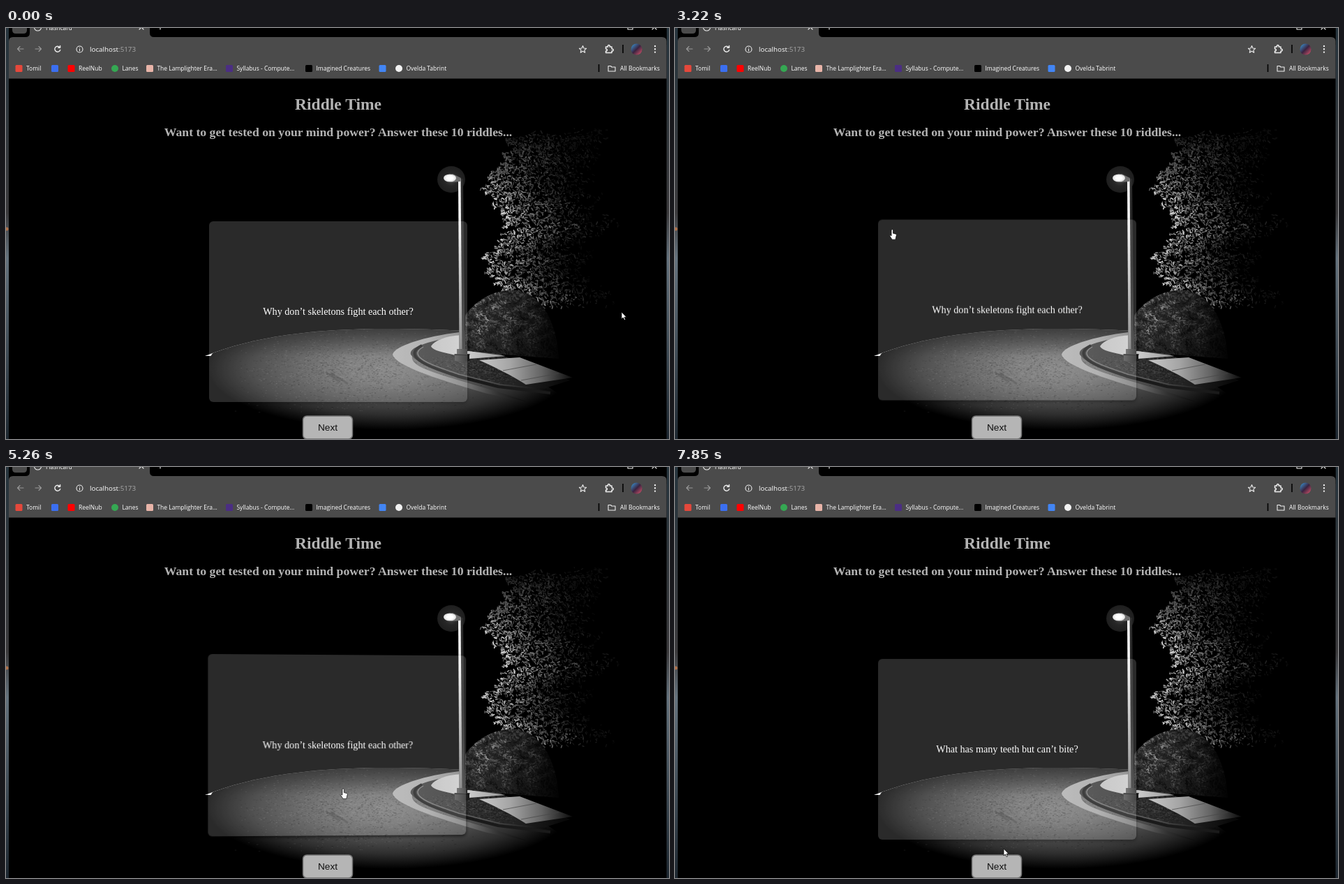
Animation of 950x589 px, one loop 8 s. Source, as an HTML page with a canvas:

```html
<!DOCTYPE html>
<html lang="en">
<head>
<meta charset="utf-8">
<title>Flashcard</title>
<style>
  html, body { margin: 0; width: 100%; height: 100%; overflow: hidden; background: #000; }
  #stage { position: relative; width: 950px; height: 589px; overflow: hidden; background: #000; }
  #stage > * { position: absolute; left: 0; top: 0; }
  .ui { font-family: "Open Sans", "Noto Sans", sans-serif; font-size: 8.5px; fill: #fff; }
  .head { font-family: "Liberation Serif", "Times New Roman", serif; font-weight: bold; fill: #b3b3b3; text-anchor: middle; }
  .line { fill: none; stroke: #eee; stroke-width: 1.1; stroke-linecap: round; stroke-linejoin: round; }
  #stage > #lift { left: 291px; top: 277.3px; width: 370px; height: 259px; perspective: 600px; }
  #card {
    width: 100%; height: 100%; border-radius: 6px; background: rgba(255, 255, 255, .165);
    display: flex; align-items: center; justify-content: center;
    font: 14.17px "Liberation Serif", "Times New Roman", serif; color: #fff; white-space: nowrap;
  }
</style>
</head>
<body>
<div id="stage">
  <canvas id="scene" width="950" height="589"></canvas>

  <svg width="950" height="589" viewBox="0 0 950 589">
    <defs>
      <linearGradient id="desk" x2="0" y2="1">
        <stop stop-color="#26343d"/><stop offset=".45" stop-color="#3b3a3c"/>
        <stop offset=".56" stop-color="#64727d"/><stop offset="1" stop-color="#1d2730"/>
      </linearGradient>
      <linearGradient id="face" x2="1" y2="1">
        <stop stop-color="#3a9fe0"/><stop offset=".5" stop-color="#3a2340"/><stop offset="1" stop-color="#e0586e"/>
      </linearGradient>
    </defs>
    <path fill="url(#desk)" d="M0 0H4V589H0ZM946.500 0H950V589H946.500Z"/>
    <circle cx="1" cy="288" r="2.500" fill="#b0714a"/>

    <path d="M4 0H946.500V24H4Z"/>
    <path fill="#4b4b4b" d="M4 72.500V19Q4 13 10 13H28Q34 13 34 7V0H206V7Q206 13 212 13H940Q946.500 13 946.500 19V72.500Z"/>
    <path fill="#4b4b4b" d="M9 0H30V3Q30 8 25 8H14Q9 8 9 3Z"/>
    <circle class="line" cx="45.500" cy="-1" r="5"/>
    <text class="ui" x="57" y="2.500">Flashcard</text>
    <path class="line" d="M191 2L194 -1L197 2M221 -3V2M891 -3V2H898V-3M926 2L929 -1L932 2"/>

    <path class="line" style="stroke:#999" d="M25 30H16.500M20 26.500L16.500 30L20 33.500M42 30H50.500M47 26.500L50.500 30L47 33.500"/>
    <path class="line" style="stroke-width:1.400" d="M77 27.700A4 4 0 1 0 77.700 31.500M77.600 25.500V28.300H74.800"/>
    <circle class="line" cx="105.500" cy="30.500" r="4.500"/>
    <path class="line" d="M105.500 30.200V32.800M105.500 28.200V28.300"/>
    <text class="ui" x="120" y="34" style="font-size:9.800px">localhost<tspan fill="#aaa">:5173</tspan></text>
    <path class="line" d="M826.500 25.500L828 29L831.600 29.300L828.900 31.700L829.700 35.200L826.500 33.300L823.300 35.200L824.100 31.700L821.400 29.300L825 29Z"/>
    <path class="line" style="stroke-width:1.500" d="M859.500 27H862.500C861.500 23.800 866 23.800 865.200 27H868V30C871 29.500 871 33.500 868 33V35.500H859.500V33C862 33 862 29.800 859.500 30Z"/>
    <path stroke="#000" stroke-width="1.600" d="M884 24V36M849.500 52V63"/>
    <circle cx="903.500" cy="30.500" r="8" fill="url(#face)"/>
    <path class="line" style="stroke-width:2.400" d="M930 26V26.010M930 30.300V30.310M930 34.600V34.610"/>
    <path class="line" d="M863 54.500H866.500L868 56H873V62H863Z"/>
    <text class="ui" x="880" y="61">All Bookmarks</text>
    <g id="marks"></g>

    <text class="head" x="476" y="116.700" font-size="23.500">Riddle Time</text>
    <text class="head" x="476" y="154.500" font-size="17.700">Want to get tested on your mind power? Answer these 10 riddles...</text>
  </svg>

  <div id="lift"><div id="card"><span id="riddle"></span></div></div>

  <svg width="950" height="589" viewBox="0 0 950 589">
    <rect x="425.500" y="556" width="71" height="33" rx="5.500" fill="#b5b5b5" stroke="#6e6e6e" stroke-width="1.500"/>
    <text x="461" y="577.300" text-anchor="middle" font-size="13.700" fill="#111" font-family="Liberation Sans, Arial, sans-serif">Next</text>
    <g id="cursor" stroke="#000" stroke-width=".7" fill="#fff">
      <path id="arrow" d="M0 0V10L2.300 8L4 11.600L5.600 11L4 7.400H7Z"/>
      <path id="hand" d="M0 0C1 0 1.400 .6 1.400 1.400V5.600L5 6.500C6 6.700 6.300 7.300 6.200 8.200L4.800 14.500H0L-3.200 9.600C-3.600 8.700 -2.500 8 -1.700 8.600L-1.100 9.200V1.400C-1.100 .6 -.8 0 0 0Z"/>
    </g>
  </svg>
</div>

<script>
const $ = id => document.getElementById(id);
const clamp = v => Math.max(0, Math.min(1, v));

// Bookmarks bar: icon centre, colour, label, round icon
const mark = (x, color, label = "", round = false) =>
  `<rect x="${x - 5}" y="53" width="10" height="10" rx="${round ? 5 : 1.5}" fill="${color}"/>` +
  `<text class="ui" x="${x + 10.4}" y="61">${label}</text>`;
$("marks").innerHTML =
  mark(18.5, "#e5483b", "Tomil") + mark(70, "#3b6ff0") + mark(93.5, "#f00", "ReelNub") +
  mark(156, "#35a853", "Lanes", true) + mark(206, "#e8b4a8", "The Lamplighter Era...") +
  mark(320, "#4b2e83", "Syllabus - Compute...") + mark(434, "#000", "Imagined Creatures") +
  mark(539.5, "#4285f4") + mark(563, "#f2f2f2", "Ovelda Tabrint", true);

// Night street, painted once
const g = $("scene").getContext("2d");
let seed = 11;
const rnd = () => (seed = (seed * 16807) % 2147483647) / 2147483647;
const spread = () => (rnd() + rnd() + rnd()) / 1.5 - 1;
const grey = (v, a = 1) => `rgba(${v},${v},${v},${a})`;

function ramp(f, levels) {
  levels.forEach((v, i) => f.addColorStop(i / (levels.length - 1), grey(v)));
  return f;
}
const across = (x0, x1, ...levels) => ramp(g.createLinearGradient(x0, 0, x1, 0), levels);
const down = (y0, y1, ...levels) => ramp(g.createLinearGradient(0, y0, 0, y1), levels);

function shape(d, fill) {
  g.fillStyle = fill;
  g.fill(new Path2D(d));
}
function stroke(d, color, width) {
  g.strokeStyle = color;
  g.lineWidth = width;
  g.stroke(new Path2D(d));
}
function glow(x, y, rx, ry, ...levels) {
  g.save();
  g.translate(x, y);
  g.scale(rx, ry);
  g.fillStyle = ramp(g.createRadialGradient(0, 0, 0, 0, 0, 1), levels);
  g.beginPath();
  g.arc(0, 0, 1, 0, 7);
  g.fill();
  g.restore();
}
function specks(n, x, y, rx, ry) {
  for (let i = 0; i < n; i++) {
    g.fillStyle = rnd() < .5 ? grey(0, .22) : grey(200, .1);
    g.fillRect(x + spread() * rx, y + spread() * ry, 1 + rnd() * 2, 1);
  }
}
function clipped(d, paint) {
  g.save();
  g.clip(new Path2D(d));
  paint();
  g.restore();
}

function paintRoad() {
  clipped("M285 470C380 432 500 426 660 434L800 530V589H285Z", () => {
    glow(550, 488, 262, 88, 118, 104, 78, 46, 0);
    g.globalCompositeOperation = "multiply";
    g.fillStyle = down(426, 470, 90, 255);
    g.fillRect(285, 426, 400, 44);
    g.globalCompositeOperation = "source-over";
    specks(2600, 500, 490, 215, 70);
    stroke("M458 493L478 507M466 495L490 510", grey(35, .3), 3);
  });
  // curb apron, verge, curb edge, sidewalk
  shape("M650 436C600 442 556 456 554 468C558 484 620 504 690 524L745 535C690 514 606 496 588 482C570 468 592 452 650 440Z",
    across(554, 755, 175, 165, 125, 50, 0));
  clipped("M650 441C600 450 577 458 580 468C590 484 650 500 690 510L760 520L808 505L735 475L660 462Z", () => {
    g.fillStyle = across(580, 800, 60, 48, 36, 8);
    g.fillRect(570, 430, 250, 100);
    specks(1400, 685, 485, 110, 34);
  });
  stroke("M596 455C562 472 618 490 650 500L705 514L780 523", grey(26), 4);
  stroke("M598 457C570 472 622 487 652 497L708 511L775 518", across(580, 780, 130, 95, 5), 1.3);
  shape("M609 456C615 447 630 442 650 440L656 462L716 470L664 474L636 467C620 464 610 460 609 456Z",
    across(609, 716, 190, 205, 150));
  shape("M678 476L736 472L812 501L745 511C725 498 700 486 678 476Z", across(678, 812, 200, 165, 100, 10));
  stroke("M712 491L760 482M738 505L792 495", grey(70, .7), 1);
}

function leaf(x, y, light) {
  const angle = rnd() * 2.6 - .6, len = 1 + rnd() * 3;
  g.strokeStyle = grey(Math.round(light * (.4 + rnd())));
  g.lineWidth = .8 + rnd();
  g.beginPath();
  g.moveTo(x, y);
  g.lineTo(x + Math.cos(angle) * len, y + Math.sin(angle) * len);
  g.stroke();
}

function paintTrees() {
  g.lineCap = "round";
  // branches reach left towards the lamp and darken away from it
  for (let y = 160; y < 405; y += 5) {
    const tip = 704 - 17 * Math.cos((y - 225) / 18.3) + spread() * 16;
    const lit = clamp((y - 145) / 95), reach = 130 + spread() * 40;
    for (let i = 0; i < 75; i++) {
      const u = rnd() ** 1.2;
      leaf(tip + u * reach, y - 12 * u + spread() * (3 + 16 * u), 12 + 165 * lit * (1 - u) ** 1.4);
    }
  }
  // rounded bush
  clipped("M658 462V412C672 392 700 374 728 376C765 378 790 420 792 474L716 468Z", () => {
    g.fillStyle = across(658, 790, 42, 30, 4);
    g.fillRect(650, 370, 150, 110);
    for (let i = 0; i < 3000; i++) {
      const x = 656 + rnd() * 134, y = 374 + rnd() * 98;
      const tuft = .5 + .5 * Math.sin(x / 6 + 2 * Math.sin(y / 7)) * Math.cos(y / 6);
      leaf(x, y, (30 + 95 * tuft) * clamp((800 - x) / 110) * clamp((500 - y) / 75));
    }
  });
}

function paintLamp() {
  glow(638, 217, 20, 19, 70, 55, 38, 34, 30);
  shape("M648 216H655L657.500 461H649.500Z", down(216, 461, 45, 28, 50));
  shape("M648 216H651.500L653.500 461H649.500Z", down(216, 461, 255, 235, 175, 120));
  shape("M628 213L640 209L652 215L651 220L640 221L628 218Z", grey(110));
  glow(636, 215, 9, 5.5, 255, 255, 220);
  shape("M646 460H661V467H646Z", across(646, 661, 95, 40));
  shape("M643 468H664V477Q653 480 643 477Z", across(643, 664, 80, 25));
  stroke("M643 468H664", grey(15), 1.5);
}

paintRoad();
paintTrees();
paintLamp();

// The screen refreshes in bursts: first time, last time, count
const bursts = [
  [150, 420, 3], [820, 1750, 8], [1870, 2800, 8], [2920, 3850, 8], [4000, 4000, 1],
  [4280, 4520, 3], [5110, 6040, 8], [6160, 6160, 1], [6470, 7430, 8], [7580, 7850, 3]
];
const ticks = [0, ...bursts.flatMap(([a, b, n]) =>
  Array.from({ length: n }, (_, i) => a + (b - a) * i / Math.max(1, n - 1)))];

// Pointer stops: time, x, y
const stops = [
  [0, 882, 407], [420, 867, 430], [700, 867, 430], [1086, 548, 491], [2260, 457, 304], [2410, 457, 304],
  [2660, 228, 112], [2800, 209, 163], [3850, 487, 505], [4000, 483, 429], [4600, 483, 429],
  [5100, 483, 461], [5300, 483, 461], [5900, 463, 566], [6250, 463, 566], [6744, 457, 354],
  [7430, 459, 430], [7790, 471, 547]
];
function pointer(t) {
  const i = stops.findIndex(s => s[0] > t);
  if (i < 1) return stops[i < 0 ? stops.length - 1 : 0].slice(1);
  const [t0, x0, y0] = stops[i - 1], [t1, x1, y1] = stops[i], p = (t - t0) / (t1 - t0);
  return [x0 + (x1 - x0) * p, y0 + (y1 - y0) * p];
}
const overCard = ([x, y]) => x > 291 && x < 661 && y > 273 && y < 530;
const overNext = ([x, y]) => x > 425 && x < 497 && y > 556;

// The card rises while hovered, following the last 160 ms
function rise(t) {
  let sum = 0;
  for (let back = 0; back < 160; back += 10) sum += overCard(pointer(Math.max(0, t - back)));
  return 7.8 * sum / 16;
}

// Each click turns the card half round, the next turns it back
function ease(p) {
  const q = 1 - (1 - clamp(p)) ** 1.6;
  return q * q * (3 - 2 * q);
}
const turned = (t, click) => 180 * ease((t - click) / 400);
const turn = t => turned(t, 4250) - turned(t, 4910) + turned(t, 6848) - turned(t, 7280);

function draw(now) {
  const time = Math.max(0, now - start) % 8000;
  const t = ticks.filter(v => v <= time + 25).pop();
  const spot = pointer(t), up = rise(t), angle = turn(t);
  const pointing = overCard(spot) || overNext(spot);

  $("lift").style.transform = `translateY(${-up}px)`;
  $("card").style.transform = `rotateY(${angle}deg)`;
  $("card").style.boxShadow = `0 2px 5px rgba(0,0,0,${.25 + up * .05})`;
  $("riddle").textContent = t < 6160 ? "Why don’t skeletons fight each other?" : "What has many teeth but can’t bite?";
  $("riddle").style.visibility = angle > 90 ? "hidden" : "visible";
  $("cursor").setAttribute("transform", `translate(${spot})`);
  $("hand").style.display = pointing ? "" : "none";
  $("arrow").style.display = pointing ? "none" : "";
  requestAnimationFrame(draw);
}
const start = performance.now();
draw(start);
</script>
</body>
</html>
```
